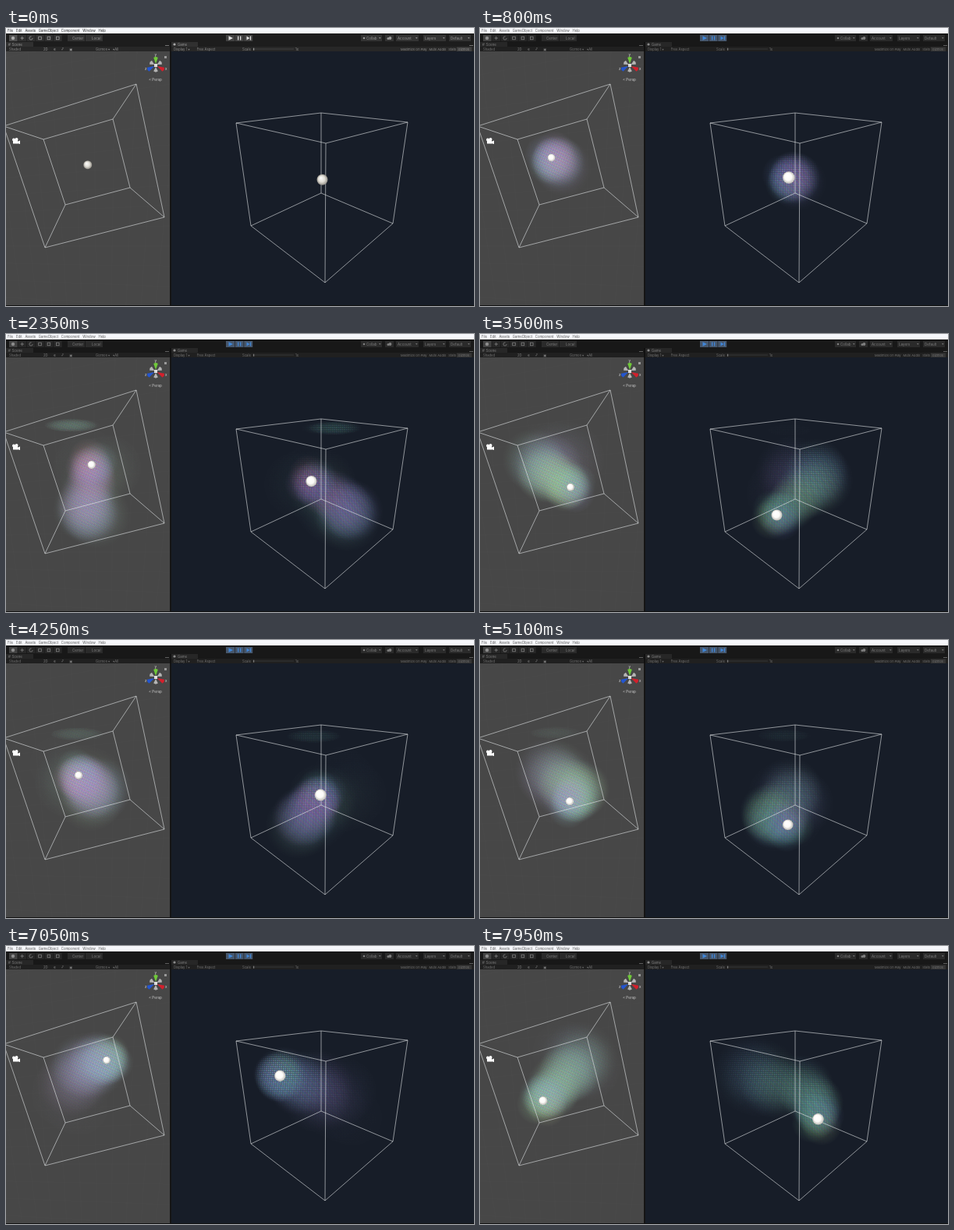
Recreate the animation shown at these times as an HTML page with a canvas. Size 600 by 357 pixels, loop 8000 ms.

```html
<!DOCTYPE html>
<html lang="en">
<head>
<meta charset="utf-8">
<title>Smoke volume in an editor</title>
<style>
html, body { margin: 0; width: 100%; height: 100%; overflow: hidden; background: #171d28; }
canvas { display: block; }
</style>
</head>
<body>
<canvas id="stage" width="600" height="357"></canvas>
<script>
const W = 600, H = 357, LOOP = 8000, PLAY_AT = 300, EMIT_AT = 420, LIFE = 1400;
const ctx = document.getElementById('stage').getContext('2d');
const lerp = (a, b, k) => a + (b - a) * k;

// Ball path inside the cube (-1..1): time, right, down, toward the scene camera
const path = [
  [EMIT_AT, 0, 0, 0],
  [900, -.2, -.25, -.45],
  [1200, .3, -.1, -.1],
  [1450, -.06, .65, .38],
  [1950, -.2, .6, .55],
  [2350, .12, -.1, -.16],
  [2950, -.45, -.25, .15],
  [3500, .09, .47, -.42],
  [4350, -.2, -.1, -.25],
  [4800, .35, .5, -.45],
  [5100, .02, .61, -.21],
  [5600, -.35, .3, .35],
  [6200, -.16, -.25, -.22],
  [7000, .6, -.4, -.5],
  [7600, -.1, 0, .3],
  [LOOP, -.56, .3, -.02]
];

// Corners are in binary order: bit 0 right, bit 1 down, bit 2 toward the scene camera.
// depth is how the distance to the camera grows along each axis.
const views = [
  { clip: [0, 30, 210, 326], radius: 5.5, depth: [0, 0, -.3], across: [1, 0, 0], pitch: 2.4 / 68,
    corners: [[48, 143], [137, 117], [76, 227], [159, 205], [-3, 126], [167, 72], [50, 282], [203, 243]] },
  { clip: [212, 30, 388, 326], radius: 7, depth: [.13, .1, .13], across: [-1, 0, 1], pitch: 2.4 / 105,
    corners: [[410, 148], [295, 122], [409, 327], [314, 254], [515, 121], [404, 109], [496, 251], [404, 212]] }
];

function project({ corners, depth }, point) {
  let x = 0, y = 0, distance = 0;
  corners.forEach(([cx, cy], n) => {
    let share = 1 / 8, far = 1;
    for (let axis = 0; axis < 3; axis++) {
      const side = n >> axis & 1 ? 1 : -1;
      share *= 1 + side * point[axis];
      far += side * depth[axis];
    }
    x += cx * share * far;
    y += cy * share * far;
    distance += share * far;
  });
  return { x: x / distance, y: y / distance, distance };
}

// Smooth curve through the path points, at rest before the first
function position(t) {
  const last = path.length - 1;
  if (t <= EMIT_AT) return [0, 0, 0];
  let i = 0;
  while (i < last - 1 && t >= path[i + 1][0]) i++;
  const a = path[i], b = path[i + 1], span = b[0] - a[0], k = (t - a[0]) / span;
  return [1, 2, 3].map(axis => {
    const slope = n => {
      const p = path[Math.max(n - 1, 0)], q = path[Math.min(n + 1, last)];
      return n ? (q[axis] - p[axis]) / (q[0] - p[0]) : 0;
    };
    const bend = k * (1 - k) * span * (slope(i) * (1 - k) - slope(i + 1) * k);
    return lerp(a[axis], b[axis], k * k * (3 - 2 * k)) + bend;
  });
}

// Falling smoke is green, rising smoke is magenta
function hueAt(t) {
  const fall = position(t)[1] - position(t - 80)[1];
  return 205 - 85 * Math.tanh(fall * 12);
}

function layer(paint) {
  const canvas = document.createElement('canvas');
  canvas.width = W;
  canvas.height = H;
  if (paint) paint(canvas.getContext('2d'));
  return canvas;
}

function clipped(c, view, paint) {
  c.save();
  c.beginPath();
  c.rect(...view.clip);
  c.clip();
  paint();
  c.restore();
}

function rect(c, color, x, y, w, h) {
  c.fillStyle = color;
  c.fillRect(x, y, w, h);
}

function line(c, color, width, ...points) {
  c.strokeStyle = color;
  c.lineWidth = width;
  c.beginPath();
  points.forEach(p => c.lineTo(...p));
  c.stroke();
}

function shape(c, color, ...points) {
  c.fillStyle = color;
  c.beginPath();
  points.forEach(p => c.lineTo(...p));
  c.fill();
}

function disc(c, color, x, y, r) {
  c.fillStyle = color;
  c.beginPath();
  c.arc(x, y, r, 0, 7);
  c.fill();
}

// Words set one after another, split at each bar
function row(c, words, x, y, color = '#8a8a8a', size = 4.2, gap = 4) {
  c.font = size + 'px Inter, Arial, sans-serif';
  c.fillStyle = color;
  for (const word of words.split('|')) {
    c.fillText(word, x, y);
    x += c.measureText(word).width + gap;
  }
}

function paintGizmo(c) {
  const cone = (color, angle, reach) => {
    c.save();
    c.translate(192, 48);
    c.rotate(angle * Math.PI / 180);
    shape(c, color, [2, 0], [reach, -2.8], [reach + 1.2, 0], [reach, 2.8]);
    c.restore();
  };
  [-30, 90, 210].forEach(angle => cone('#b5b5b5', angle, 7.5));
  cone('#70c93a', -90, 10);
  cone('#d3202c', 28, 11);
  cone('#2456cf', 152, 11);
  rect(c, '#ddd', 190, 46, 4, 4);
  row(c, 'y', 190.5, 36, '#ddd', 4.5);
  row(c, 'x', 204, 54, '#ddd', 4.5);
  row(c, 'z', 178, 54, '#ddd', 4.5);
  row(c, '< Persp', 183, 68, '#ccc', 4.6);
  rect(c, '#999', 203, 36, 3, 3);
}

function paintScene(c) {
  rect(c, '#474747', ...views[0].clip);
  for (let i = -6; i < 16; i++) {
    line(c, 'rgba(255,255,255,.025)', .6, [i * 28, 30], [i * 19 + 40, 356]);
    line(c, 'rgba(255,255,255,.025)', .6, [0, 60 + i * 22], [210, 20 + i * 26]);
  }
  paintGizmo(c);
  // Camera marker
  rect(c, '#fff', 9, 144, 6, 4.5);
  shape(c, '#fff', [14, 146], [18, 144.5], [18, 149], [14, 148]);
  disc(c, '#fff', 10, 143.5, 2);
  disc(c, '#fff', 13.5, 143, 2);
}

function paintChrome(c) {
  rect(c, '#f5f7fa', 0, 0, W, 7);
  row(c, 'File|Edit|Assets|GameObject|Component|Window|Help', 2, 5, '#222', 4.3, 3.8);
  rect(c, '#1d1d1d', 0, 7, W, 23);
  rect(c, '#272727', 0, 24, W, 6);
  rect(c, '#303030', 0, 18, 35, 6);
  rect(c, '#303030', 212, 18, 34, 6);

  for (let i = 0; i < 6; i++) rect(c, i ? '#303030' : '#505050', 4 + i * 11.4, 9, 10.6, 8);
  disc(c, '#aaa', 9, 13, 2.2);
  line(c, '#aaa', .7, [18.5, 13], [23, 13]);
  line(c, '#aaa', .7, [20.7, 10.8], [20.7, 15.2]);
  c.beginPath();
  c.arc(32, 13, 2.1, 0, 5);
  c.stroke();
  for (let i = 3; i < 6; i++) c.strokeRect(7.5 + i * 11.4, 11.2, 3.6, 3.6);

  const button = (text, x, w, textX, arrow) => {
    rect(c, '#333', x, 9, w, 8);
    row(c, text, x + textX, 14.6, '#999', 4.5);
    if (arrow) shape(c, '#888', [x + w - 4, 12], [x + w - 1.4, 12], [x + w - 2.7, 14]);
  };
  button('Center', 79, 22, 6);
  button('Local', 102, 22, 8);
  button('Collab', 455, 27, 7, true);
  button('', 486, 11, 0);
  button('Account', 500, 29, 2, true);
  button('Layers', 535, 29, 2, true);
  button('Default', 568, 28, 2, true);
  disc(c, '#999', 459, 13, 1.3);
  disc(c, '#999', 490, 13.5, 1.5);
  disc(c, '#999', 492.5, 13, 1.9);

  row(c, '#|Scene', 3, 22.6, '#999', 4.4, 2);
  disc(c, '#aaa', 216, 21, 1.6);
  row(c, 'Game', 220, 22.6, '#999', 4.4);
  rect(c, '#404040', 578, 24.5, 19, 5.5);
  row(c, 'Shaded', 4, 28.7);
  row(c, '2D|✲|♪|▣', 48, 28.7, '#999', 4.2, 7);
  row(c, 'Gizmos ▾|▾All', 115, 28.7);
  row(c, 'Display 1 ▾|Free Aspect', 215, 28.7, '#8a8a8a', 4.2, 9);
  row(c, 'Scale', 303, 28.7);
  row(c, '1x', 371, 28.7);
  row(c, 'Maximize On Play|Mute Audio|Stats|Gizmos', 506, 28.7, '#8a8a8a', 4, 3);
  line(c, '#555', .6, [316, 27], [369, 27]);
  rect(c, '#999', 317, 25.7, 1.2, 3);
  for (const x of [204, 594]) line(c, '#999', .7, [x, 22.5], [x + 5, 22.5]);
  rect(c, '#151515', 210, 18, 2, 339);
  rect(c, '#111', 0, 356, W, 1);
}

// Fine grid of coloured points on a plane through the cube's centre
function paintLattice(c) {
  for (const view of views) clipped(c, view, () => {
    rect(c, 'rgba(60,60,60,.45)', ...view.clip);
    const columns = Math.ceil(1.5 / view.pitch), rows = 45;
    for (let j = -rows; j <= rows; j++) {
      for (let i = -columns; i <= columns; i++) {
        const { x, y } = project(view, view.across.map((a, axis) => axis === 1 ? j / 29 : a * i * view.pitch));
        rect(c, `hsl(${(i + 2 * j + 300) % 3 * 120},70%,66%)`, x, y, 1.6, 1.6);
      }
    }
  });
}

const background = layer(c => {
  rect(c, '#171d28', 0, 0, W, H);
  clipped(c, views[0], () => paintScene(c));
  paintChrome(c);
});
const lattice = layer(paintLattice);
const smoke = layer();
const fog = smoke.getContext('2d');

function puff(x, y, rx, ry, hue, alpha) {
  const tone = a => `hsla(${hue},58%,62%,${a})`;
  const g = fog.createRadialGradient(0, 0, 0, 0, 0, 1);
  g.addColorStop(0, tone(alpha));
  g.addColorStop(.5, tone(alpha * .65));
  g.addColorStop(1, tone(0));
  fog.save();
  fog.translate(x, y);
  fog.scale(rx, ry);
  disc(fog, g, 0, 0, 1);
  fog.restore();
}

function drawSmoke(t) {
  fog.globalCompositeOperation = 'source-over';
  fog.clearRect(0, 0, W, H);
  const first = Math.max(EMIT_AT, Math.ceil((t - LIFE) / 25) * 25);
  for (let born = first; born <= t; born += 25) {
    const age = (t - born) / LIFE, spot = position(born);
    const hue = hueAt(born) + 60 * Math.sin(born / 31);
    for (const view of views) {
      const { x, y } = project(view, spot), r = 24 + 24 * Math.sqrt(age), drift = 14 * age;
      puff(x + drift * Math.sin(born / 47), y + drift * Math.cos(born / 61), r, r, hue, .15 * (1 - age) ** 1.3);
      // Smoke leaving through the floor comes back under the lid
      if (spot[1] > .4) {
        const lid = project(view, [spot[0] * .4, -1, spot[2] * .4]);
        puff(lid.x, lid.y, 36, 9, 155, .07 * age * (1 - age));
      }
    }
  }
  // Dense swirl around the ball
  const rise = Math.min(1, Math.max(0, (t - EMIT_AT) / 250));
  for (const view of views) {
    const { x, y } = project(view, position(t));
    for (let k = 0; k < 4; k++) {
      const angle = k * Math.PI / 2 + t / 400;
      puff(x + 9 * Math.cos(angle), y + 9 * Math.sin(angle), 26, 26, hueAt(t) + 50 * (k - 1.5), .3 * rise);
    }
  }
  fog.globalCompositeOperation = 'source-atop';
  fog.globalAlpha = .3;
  fog.drawImage(lattice, 0, 0);
  fog.globalAlpha = 1;
  fog.globalCompositeOperation = 'destination-in';
  fog.drawImage(lattice, 0, 0);
  ctx.globalCompositeOperation = 'lighter';
  ctx.globalAlpha = .8;
  ctx.drawImage(smoke, 0, 0);
  ctx.globalAlpha = 1;
  ctx.globalCompositeOperation = 'source-over';
}

function drawBox({ corners }) {
  corners.forEach((corner, n) => {
    for (const bit of [1, 2, 4]) {
      if (!(n & bit)) line(ctx, 'rgba(225,228,230,.8)', .75, corner, corners[n | bit]);
    }
  });
}

function drawBall(view, t, playing) {
  const { x, y, distance } = project(view, position(t)), r = view.radius / distance;
  const g = ctx.createRadialGradient(x - r * .3, y - r * .35, 0, x, y, r);
  g.addColorStop(0, '#fff');
  g.addColorStop(.6, playing ? '#fbfaf7' : '#dedbd3');
  g.addColorStop(1, playing ? '#bebcb6' : '#8f8c85');
  disc(ctx, g, x, y, r);
}

function drawPlayControls(playing) {
  const icon = playing ? '#3f86d8' : '#ddd';
  for (let i = 0; i < 3; i++) rect(ctx, playing ? '#46566b' : '#414141', 282 + i * 11.6, 9, 11, 8);
  shape(ctx, icon, [285.5, 10.2], [291, 13], [285.5, 15.8]);
  for (const x of [297, 300, 312.8]) rect(ctx, icon, x, 10.5, 1.3, 5);
  shape(ctx, icon, [308.5, 10.5], [312.5, 13], [308.5, 15.5]);
}

function draw(now) {
  const t = now % LOOP, playing = t >= PLAY_AT;
  ctx.drawImage(background, 0, 0);
  if (playing) {
    rect(ctx, 'rgba(0,0,0,.18)', 0, 7, W, 23);
    rect(ctx, 'rgba(245,247,250,.25)', 0, 0, W, 7);
  }
  drawPlayControls(playing);
  drawSmoke(t);
  for (const view of views) clipped(ctx, view, () => {
    drawBox(view);
    drawBall(view, t, playing);
  });
  requestAnimationFrame(() => draw(performance.now() - start));
}

const start = performance.now();
draw(0);
</script>
</body>
</html>
```
